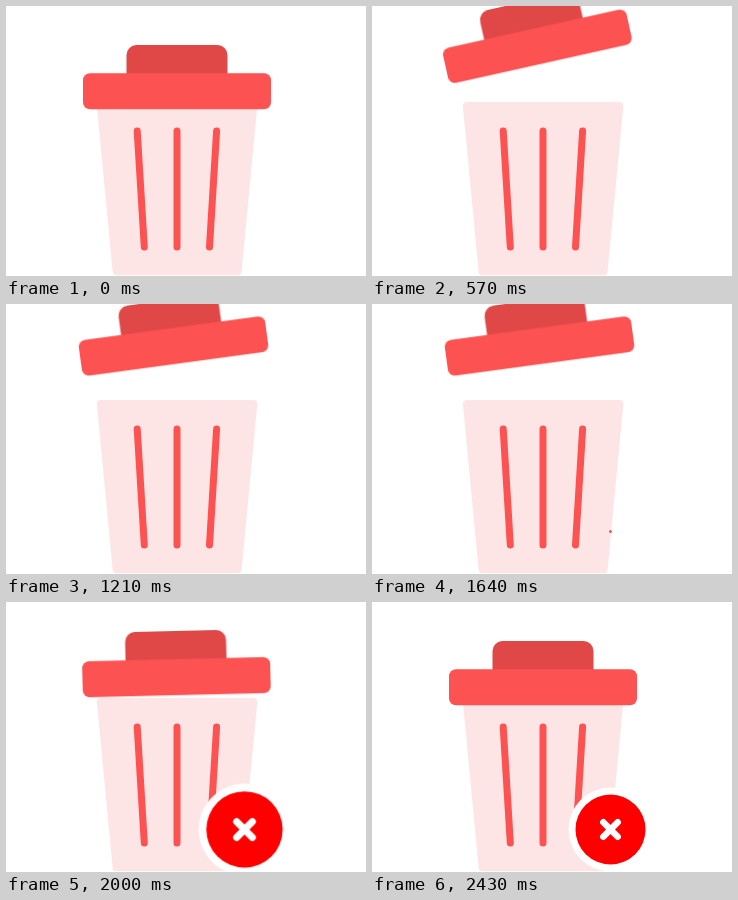
Recreate the animation shown at these times as an HTML page without scripts. Size 360 px wide and 270 px high, loop 3640 ms.

```html
<!DOCTYPE html>
<html lang="en">
<head>
<meta charset="utf-8">
<title>Delete bin</title>
<style>
  html, body { margin: 0; width: 100%; height: 100%; overflow: hidden; background: #fff; }
  svg { display: block; width: 100vw; height: 100vh; }

  .body { fill: #fee5e5; stroke: #fee5e5; stroke-width: 8; stroke-linejoin: round; }
  .ribs { fill: none; stroke: #fd5252; stroke-width: 7; stroke-linecap: round; }
  .cross { fill: none; stroke: #fff; stroke-width: 6.5; stroke-linecap: round; }

  .lid { transform-origin: 171px 85px; animation: lid 3640ms infinite; }
  .badge { transform-origin: 238.5px 227.5px; animation: pop 3640ms infinite; }

  /* lift, tilt past the rest angle, settle, hold, drop and rebound */
  @keyframes lid {
    0% { transform: translate(0, 0) rotate(0deg); animation-timing-function: cubic-bezier(.35, .1, .6, .85); }
    7.967% { transform: translate(-5px, -42.2px) rotate(-10.5deg); animation-timing-function: ease-out; }
    13.74% { transform: translate(-5.8px, -45px) rotate(-12.8deg); animation-timing-function: cubic-bezier(.4, 0, .6, .9); }
    25.55% { transform: translate(-3.6px, -44.2px) rotate(-8.3deg); animation-timing-function: ease-out; }
    33.24%, 45.05% { transform: translate(-3.5px, -43.2px) rotate(-7.7deg); animation-timing-function: cubic-bezier(.45, .05, .75, .6); }
    51.1% { transform: translate(-1.5px, -32.5px) rotate(-3.8deg); animation-timing-function: cubic-bezier(.35, .3, .6, 1); }
    58.79% { transform: translate(0, 2.4px) rotate(0deg); animation-timing-function: ease-in-out; }
    66.76%, 100% { transform: translate(0, 0) rotate(0deg); }
  }

  @keyframes pop {
    0%, 44.8% { transform: scale(0); animation-timing-function: linear; }
    45.05% { transform: scale(.03); animation-timing-function: linear; }
    51.1% { transform: scale(.857); animation-timing-function: ease-out; }
    54.95% { transform: scale(1.09); animation-timing-function: ease-in-out; }
    58.79%, 100% { transform: scale(1); }
  }
</style>
</head>
<body>
<svg viewBox="0 0 360 270">
  <path class="body" d="M94.9 100H247.3L231.6 265.3H110.6Z"/>
  <path class="ribs" d="M131.2 125L138.3 241M171 125V241M210.6 125L203.5 241"/>
  <g class="lid">
    <rect x="120.5" y="39" width="101" height="40" rx="10" fill="#e04848"/>
    <rect x="77" y="67.3" width="188" height="36" rx="7" fill="#fd5252"/>
  </g>
  <g class="badge">
    <circle cx="238.5" cy="227.5" r="42" fill="#fff"/>
    <circle cx="238.5" cy="227.5" r="35" fill="#f00"/>
    <path class="cross" d="M231.3 220.3l14.4 14.4m0-14.4l-14.4 14.4"/>
  </g>
</svg>
</body>
</html>
```
